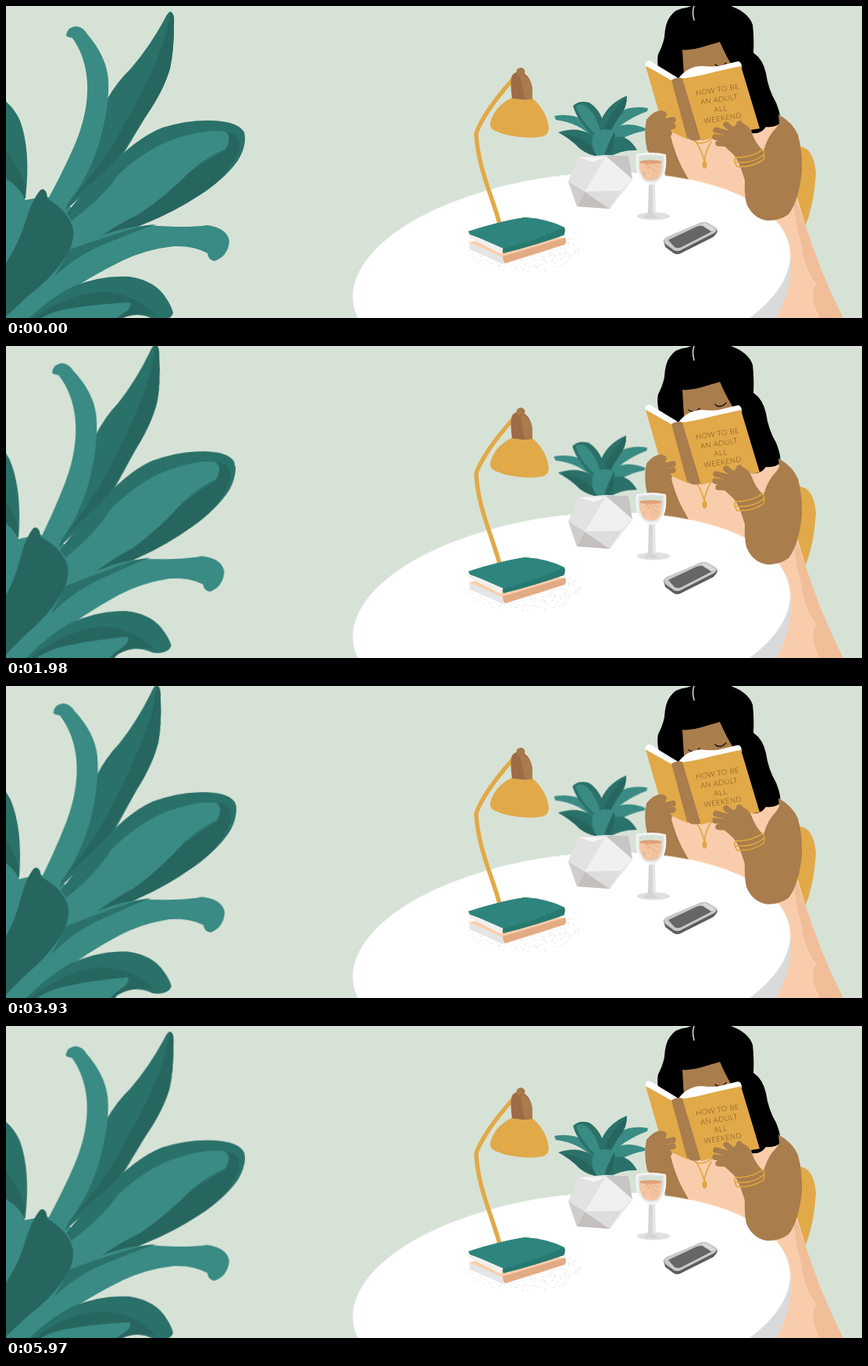
Recreate the animation shown at these times as an HTML page. Size 1096 by 400 pixels, loop 6000 ms.

```html
<!DOCTYPE html>
<html lang="en">
<head>
<meta charset="utf-8">
<title>Reading at the table</title>
<style>
  html, body { margin: 0; width: 100%; height: 100%; overflow: hidden; background: #d7e2d6; }
  svg { display: block; width: 100vw; height: 100vh; }
  .palm { transform-origin: -10px 445px; }
  .potted { transform-origin: 762px 194px; }
  .light { fill: #398b84; }
  .mid { fill: #2a7169; }
  .deep { fill: #27665f; }
  .gold { fill: #e1a948; }
  .skin { fill: #a97d4c; }
  .peach { fill: #f9cdac; }
  .line { fill: none; stroke-linecap: round; stroke-linejoin: round; }
  .fingers { stroke: #a97d4c; stroke-width: 7.5; }
  .jewel { stroke: #dfa63c; stroke-width: 1.6; }
  .title { font: 300 9.3px Lato, "Open Sans", sans-serif; fill: #6f4a1c; text-anchor: middle; letter-spacing: .45px; }
</style>
</head>
<body>
<svg viewBox="0 0 1096 400" preserveAspectRatio="none">
  <rect width="1096" height="400" fill="#d7e2d6"/>

  <g class="palm">
    <path class="light" d="M-40 470V260L52 244L92 262L125 297L70 375L30 470Z"/>
    <path class="mid" d="M-30 105Q5 118 18 147Q32 185 25 246L-30 300Z"/>
    <path class="deep" d="M-30 165Q8 180 25 232L24 250L-30 290Z"/>
    <path class="light" d="M-40 205Q10 218 24 247Q26 280 12 305L-40 390Z"/>
    <path class="mid" d="M210 7Q216 9 215 24Q215 58 210 80Q202 108 180 140L150 190L128 216L76 262L88 215Q112 165 128 122Q142 97 160 80Q184 52 203 17Q206 10 210 7Z"/>
    <path class="deep" d="M211 8Q216 9 215 24Q215 58 210 80Q202 108 180 140L140 200L82 250Q130 195 155 145Q192 80 205 35Z"/>
    <path class="light" d="M77 38Q78 27 90 26Q99 27 104 36Q129 65 131 95Q133 130 118 180Q104 222 80 252L62 275L46 262Q72 215 88 178Q106 135 104 98Q102 65 85 41Q79 40 77 38Z"/>
    <path class="mid" d="M70 275Q100 236 128 211Q165 170 200 156Q235 145 268 147Q298 149 305 162Q309 178 297 198Q280 222 247 243Q215 264 180 278Q135 295 86 330Z"/>
    <path class="deep" d="M88 318Q160 270 200 238Q245 205 281 185Q290 172 283 162Q300 162 299 184Q283 222 247 243Q215 264 180 278Z"/>
    <path class="light" d="M78 280Q125 245 143 217Q180 182 220 169Q260 157 280 161Q290 167 281 183Q258 193 238 210Q205 244 170 267Q125 288 85 325Z"/>
    <path class="light" d="M-40 470L-35 330Q35 250 50 245Q80 260 88 285L110 300Q145 283 185 281Q228 285 258 281Q284 285 286 302Q284 321 267 327Q259 326 258 317Q240 307 215 308Q180 312 150 326Q105 348 72 372L45 470Z"/>
    <path class="mid" d="M82 312Q130 295 158 287Q175 281 192 280Q162 290 142 299Q95 315 62 347Z"/>
    <path class="mid" d="M-20 455Q35 385 85 360Q120 345 158 347Q192 352 206 376Q213 387 214 394Q210 405 190 402Q168 390 145 402L95 455Z"/>
    <path class="deep" d="M10 420Q70 368 125 366Q162 367 192 397Q168 390 145 402L95 440Z"/>
    <path class="light" d="M-20 455Q25 402 70 390Q112 382 158 380Q162 382 156 390L139 402L90 455Z"/>
    <path class="deep" d="M-60 410Q8 330 23 282Q33 248 44 236Q49 233 52 240L53 247Q80 263 86 286Q88 306 74 325Q58 349 28 372L-40 435Z"/>
  </g>

  <path class="gold" d="M1014 180Q1034 180 1037 214Q1035 254 1022 286L1005 250Z"/>

  <g class="reader">
    <path class="skin" d="M820 146Q827 137 838 138L859 168L880 236L846 236L844 215Q836 203 821 185Q816 164 820 146Z"/>
  </g>

  <path class="peach" d="M850 163Q856 188 865 206L875 224L900 300L970 410H1076Q1052 360 1040 328Q1024 285 1013 245L1004 170L990 147L940 130H860Z"/>
  <path d="M1011 245Q1024 285 1040 328Q1052 360 1074 404H1044Q1026 370 1038 357Q1021 335 1019 308Q1011 280 1008 248Z" fill="#f0be98"/>
  <path class="skin" d="M862 45H930L934 105H864Z"/>
  <path d="M880 -1H925Q950 7 956 24Q958 40 957 60Q969 68 973 86Q976 107 986 124Q993 141 991 150Q986 156 973 155Q966 165 955 163L935 85Q924 69 914 46Q900 50 890 53Q878 57 866 56Q867 75 869 102L840 96Q832 76 835 62Q841 50 843 40Q844 22 850 14Q857 3 872 2Z"/>
  <path class="line" d="M881 0Q878 8 881 18" stroke="#d7e2d6" stroke-width="1.5"/>
  <path class="line" d="M874 82Q881 87 888 80M908 75Q914 81 922 73" stroke="#17110c" stroke-width="1.5"/>
  <path class="line jewel" d="M876 168Q888 184 906 168M883 174Q889 181 894 198Q896 186 903 174"/>
  <ellipse cx="894.5" cy="203.500" rx="3" ry="5" fill="#dfa63c"/>

  <path d="M1002 306Q1008 335 1002 360Q996 384 985 402H950Z" fill="#d9dadb"/>
  <g transform="translate(724 346) skewY(-5.4)">
    <ellipse rx="280" ry="130" fill="#fff"/>
  </g>

  <g id="grain" fill="#cfcfcf"></g>

  <g>
    <path d="M593 303L637 322V331L594 312Z" fill="#e5e5e5"/>
    <path class="peach" d="M593 303L665 285L716 298L717 305L638 330L636 322Z"/>
    <path d="M636 321L716 297Q718 303 715 306L639 330Q636 326 636 321Z" fill="#e3ab84"/>
    <path class="line" d="M632 279C622 242 604 207 602 163Q612 136 648 95" stroke="#e1a948" stroke-width="5.500"/>
    <path d="M593 289L637 308L634 318L593 297Z" fill="#f0f1ef"/>
    <path d="M592 289Q632 276 664 271Q694 273 715 284Q717 289 714 294Q677 307 637 317Q635 315 637 308L594 293Z" fill="#27796f"/>
    <path d="M592 289Q632 276 664 271Q694 273 715 284Q677 301 637 311L594 292Z" fill="#2e857d"/>
    <path d="M648 119Q645 97 648 89Q652 83 661 85Q673 91 674 108V121Z" fill="#9d6b45"/>
    <path d="M658 87Q673 91 674 108V121L664 119Z" fill="#a97c4e"/>
    <circle cx="659" cy="84.500" r="5.500" fill="#a5774a"/>
    <path class="gold" d="M647 118Q661 122 675 119Q694 137 695 158Q694 167 683 168Q650 171 626 160Q619 157 620 150Q625 129 647 118Z"/>
  </g>

  <g class="potted">
    <path class="light" d="M702 141Q722 137 740 146Q757 155 764 176L752 170Q735 150 704 146Z"/>
    <path class="light" d="M822 131Q800 127 786 136Q772 147 766 172Q790 146 821 135Z"/>
    <path class="mid" d="M795 115Q796 130 784 143L770 167L760 152Q768 126 795 115Z"/>
    <path class="deep" d="M794 117Q796 130 784 143L770 167L766 156Q776 135 794 117Z"/>
    <path class="mid" d="M726 128Q734 120 747 124Q763 134 768 160L758 172Q732 150 726 128Z"/>
    <path class="light" d="M730 128Q737 123 745 130Q757 142 762 164L756 166Q735 147 730 128Z"/>
    <path class="mid" d="M707 162Q730 154 748 164Q761 174 764 194Q745 191 735 183Q722 170 707 162Z"/>
    <path class="deep" d="M712 164Q742 166 762 194Q745 191 735 183Q724 171 712 164Z"/>
    <path class="light" d="M819 157Q800 149 784 154Q768 162 764 190Q785 166 818 160Z"/>
    <path class="mid" d="M808 185Q797 165 780 168Q768 176 764 194H772Q788 184 808 185Z"/>
    <path class="light" d="M752 166Q764 153 779 161Q782 180 771 194H758Q747 180 752 166Z"/>
    <path class="deep" d="M779 161Q782 180 771 194H765Q770 178 779 161Z"/>
  </g>
  <g>
    <path d="M733 194L767 191L797 192L802 223L773 260L731 257L720 225Z" fill="#e7e7e7"/>
    <path d="M733 194H768L741 238L720 225Z" fill="#e3e2e2"/>
    <path d="M768 192L797 192L802 222Z" fill="#c8c5c6"/>
    <path d="M768 193L741 238L787 237L802 222Z" fill="#f0f0f1"/>
    <path d="M741 238L731 257L773 260Z" fill="#c5bfbe"/>
    <path d="M720 225L741 238L731 257Z" fill="#cfcdcd"/>
    <path d="M741 238L787 237L773 260Z" fill="#dedddd"/>
    <path d="M733 194H768L752 200Z" fill="#f5f5f5"/>
  </g>

  <g>
    <path d="M808 191Q826 187 844 191Q846 217 835 225L831 228L832 266L822 266L824 228Q806 219 808 191Z" fill="#e5e7e6"/>
    <path d="M811 193Q826 190 841 193V201H811Z" fill="#d6e1d6"/>
    <path class="line" d="M808 191Q826 187 844 191Q846 217 835 225Q826 230 817 225Q806 217 808 191Z" stroke="#f8f8f7" stroke-width="2"/>
    <path d="M811 200Q826 196 840 200Q841 216 834 222Q826 226 818 222Q811 215 811 200Z" fill="#f4c6a3"/>
    <ellipse cx="825.500" cy="200" rx="14.500" ry="2.500" fill="#dfa278"/>
    <g id="fizz" fill="#dda079"></g>
    <ellipse cx="829" cy="269.500" rx="21" ry="5" fill="#e0e0e1"/>
    <path d="M823 229L828 230L828 266L836 272H816L822 266Z" fill="#d4d4d5"/>
  </g>

  <g>
    <path d="M842 301Q843 298 848 296L889 278Q894 276 898 278L908 284Q912 287 910 291L906 296L866 316Q860 320 855 317L844 309Z" fill="#5d5d5d"/>
    <path d="M842 300Q843 297 848 295L889 278Q894 276 898 278L908 284Q912 287 907 291L866 312Q860 316 855 313L844 305Z" fill="#c9c9ca"/>
    <path d="M848 300L884 283Q892 280 897 283L904 289L867 308Q861 312 856 309Z" fill="#666"/>
    <path d="M889 280L895 278L908 286L903 289Z" fill="#d9d9d9"/>
  </g>

  <g class="reader">
    <path class="gold" d="M819 77L856 94L873 171L842 157Z"/>
    <path d="M818 76Q819 70 824 70L860 92L855 97Z" fill="#fff"/>
    <path d="M860 94Q873 76 893 77Q903 78 912 77L937 71Q942 71 942 79L866 96Z" fill="#fff"/>
    <path d="M852 95Q859 90 867 93L890 171Q880 175 872 169Z" fill="#a97d4c"/>
    <path class="gold" d="M866 93Q883 91 905 85L941 77L965 157Q925 163 890 173Z"/>
    <g class="title" transform="translate(911.500 110.500) rotate(-9)">
      <text>HOW TO BE</text>
      <text y="12.500">AN ADULT</text>
      <text y="25">ALL</text>
      <text x="1" y="37">WEEKEND</text>
    </g>
    <path class="skin" d="M820 146Q829 134 839 134Q848 136 844 144L851 163Q849 172 845 176L824 178Z"/>
    <path class="line fingers" d="M830 145L842 139M836 150L854 146M837 158L854 154M838 164L849 163"/>
    <path class="skin" d="M940 149Q952 153 955 163Q960 177 970 186Q974 171 981 162Q987 156 990 150L989 139Q1007 149 1014 165Q1020 187 1019 213Q1015 250 1002 267Q989 276 974 275Q956 272 948 253Q945 239 946 224Q939 199 931 190L920 180Q916 170 924 160Z"/>
    <path class="line fingers" d="M935 163L922 152M931 165L909 159M930 171L908 168M932 177L912 176M944 163L939 151"/>
    <path class="line jewel" d="M934 194Q954 195 969 184M933 200Q955 203 970 191M936 206Q956 207 970 197M934 194Q931 198 936 206M969 184Q972 190 970 197"/>
  </g>
</svg>
<script>
  const $ = q => document.querySelectorAll(q);

  // Out to the far pose and back, evenly, in 30 ms steps.
  const sway = (query, far) => $(query).forEach(el => el.animate([
    { transform: 'none', easing: 'steps(50)' },
    { transform: far, easing: 'steps(50)' },
    { transform: 'none' }
  ], { duration: 3000, iterations: Infinity }));

  sway('.palm', 'rotate(-3.7deg)');
  sway('.potted', 'rotate(-1deg)');
  sway('.reader', 'translate(0px, 7.5px)');

  let seed = 7;
  const rnd = () => (seed = seed * 16807 % 2147483647) / 2147483647;

  function speckle(id, n, cx, cy, rx, ry, size) {
    let dots = '';
    for (let i = 0; i < n; i++) {
      const a = rnd() * 2 * Math.PI, d = Math.sqrt(rnd());
      const x = cx + Math.cos(a) * d * rx, y = cy + Math.sin(a) * d * ry;
      dots += `<circle cx="${x.toFixed(1)}" cy="${y.toFixed(1)}" r="${size}"/>`;
    }
    document.getElementById(id).innerHTML = dots;
  }
  speckle('grain', 480, 662, 312, 74, 29, .5);
  speckle('fizz', 45, 826, 211, 11, 10, .6);
</script>
</body>
</html>
```
